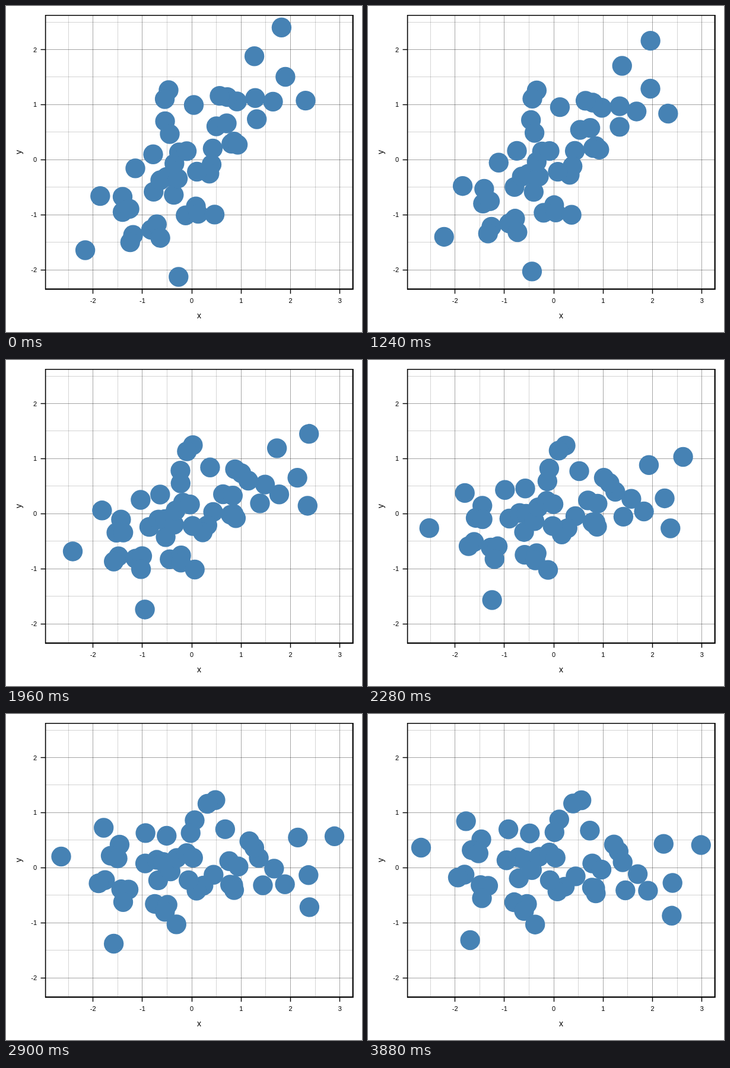
Write an HTML page that moves like this. It is 600 px wide and 550 px high and loops after 4000 ms.

```html
<!DOCTYPE html>
<html lang="en">
<head>
<meta charset="utf-8">
<title>Scatter plot rotation</title>
<style>
  html, body { margin: 0; width: 100%; height: 100%; overflow: hidden; background: #fff; }
  svg { display: block; }
  text { font: 11px "Liberation Sans", Arial, sans-serif; text-anchor: middle; }
  .title { font-size: 14px; }
  .y { text-anchor: end; }
  .major { stroke: #000; stroke-opacity: .35; }
  .minor { stroke: #000; stroke-opacity: .17; }
  .tick { stroke: #000; stroke-width: 1.4; }
</style>
</head>
<body>
<svg width="600" height="550" viewBox="0 0 600 550">
  <g id="grid"></g>
  <g id="dots" fill="#4682b4"></g>
  <path d="M66.6 478.5V15.8H585" fill="none" stroke="#000" stroke-width="1.6"/>
  <path d="M66 477.7H584.7V15" fill="none" stroke="#000" stroke-width="2.2"/>
  <g id="axes"></g>
  <text class="title" x="325.5" y="527">x</text>
  <text class="title" transform="translate(25.5 246.5) rotate(-90)">y</text>
</svg>
<script>
const X0 = 313.1, Y0 = 259.3, SX = 83.2, SY = 92.9;
const LOOP = 4000, STEP = 20, LAST = 199;
const px = x => X0 + x * SX;
const py = y => Y0 - y * SY;

// Starting centres in pixels
const starts = [
  [464.4, 36.3], [418.6, 84.7], [470.9, 119.5], [505, 159.6], [450, 161.4],
  [420, 155.2], [389.3, 161], [373, 153.6], [360, 151.6], [316.5, 167],
  [274, 142], [267.6, 157], [268.1, 194.5], [276, 216], [354.5, 203],
  [372, 198], [422.7, 191], [248, 250.3], [218, 273.9], [158.8, 320.6],
  [196.5, 321.9], [196.5, 347.6], [208.1, 342.3], [133.6, 412], [214.2, 386.3],
  [209.3, 398.6], [244.5, 377.5], [254.2, 368.3], [260.1, 391.3], [290.8, 457],
  [302.8, 353.2], [320, 338.2], [323.9, 350.5], [351.6, 351.9], [282.8, 318.6],
  [248.8, 313.4], [260, 294], [270.7, 288.4], [289.6, 291.1], [283.8, 265.9],
  [291.6, 247], [304.6, 244.9], [348.4, 240.5], [346.5, 267.4], [342.8, 282.8],
  [321.8, 279.5], [379.9, 232.2], [384.3, 228.6], [390.6, 234]
];

const make = (parent, tag, attrs, text = "") => {
  const el = document.createElementNS("http://www.w3.org/2000/svg", tag);
  for (const key in attrs) el.setAttribute(key, attrs[key]);
  el.textContent = text;
  return document.getElementById(parent).appendChild(el);
};
const line = (parent, cls, x1, y1, x2, y2) =>
  make(parent, "line", { class: cls, x1, y1, x2, y2 });
const crisp = v => Math.floor(v) + .5;

for (let v = -2.5; v <= 3; v += .5) {
  const whole = v % 1 === 0, cls = whole ? "major" : "minor";
  const x = crisp(px(v)), y = crisp(py(v));
  line("grid", cls, x, 16, x, 477);
  if (whole) {
    line("axes", "tick", x, 478, x, 485.5);
    make("axes", "text", { x: px(v), y: 501 }, v);
  }
  if (v < -2 || v > 2.5) continue;
  line("grid", cls, 67, y, 584, y);
  if (whole) {
    line("axes", "tick", 58.5, y, 66, y);
    make("axes", "text", { class: "y", x: 52, y: py(v) + 4 }, v);
  }
}

// Each point travels straight to its place after a 45 degree clockwise turn
const dots = starts.map(([cx, cy]) => {
  const x = (cx - X0) / SX, y = (Y0 - cy) / SY;
  return {
    x, y,
    u: (x + y) * Math.SQRT1_2,
    v: (y - x) * Math.SQRT1_2,
    el: make("dots", "circle", { r: 16.7 })
  };
});

const ease = t => t < .5 ? 4 * t ** 3 : 1 - 4 * (1 - t) ** 3;

function draw() {
  const k = ease(Math.floor(performance.now() % LOOP / STEP) / LAST);
  for (const { x, y, u, v, el } of dots) {
    el.setAttribute("cx", px(x + (u - x) * k));
    el.setAttribute("cy", py(y + (v - y) * k));
  }
  requestAnimationFrame(draw);
}
draw();
</script>
</body>
</html>
```
